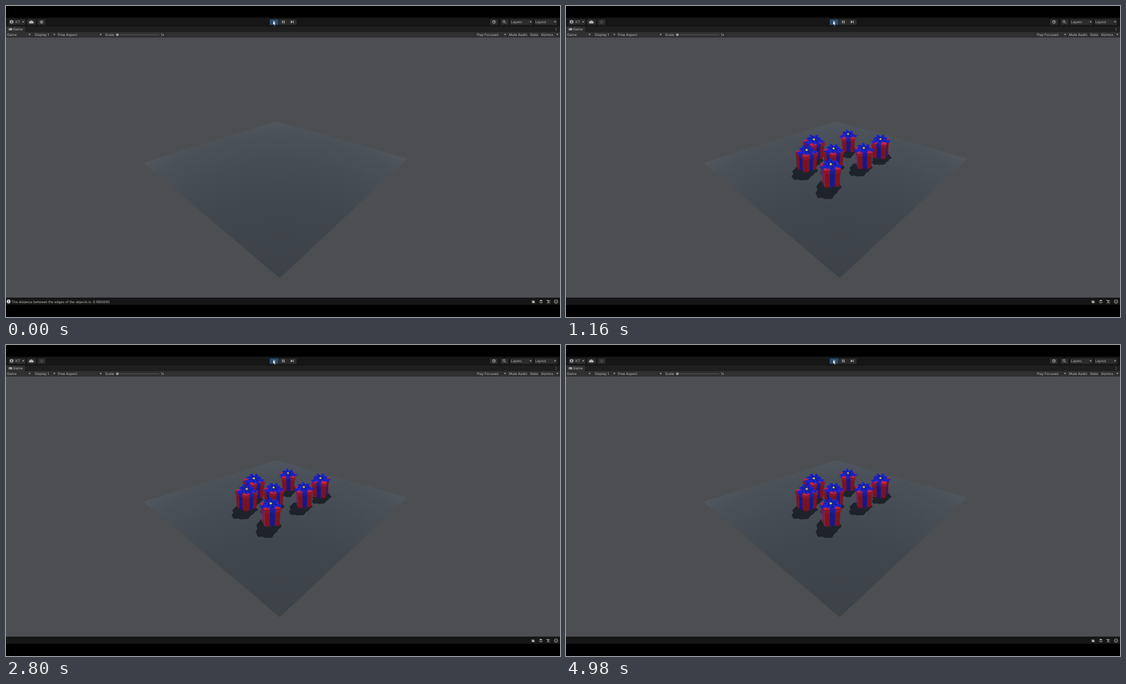
Recreate the animation shown at these times as an HTML page. Size 998 px wide and 561 px high, loop 5020 ms.

```html
<!DOCTYPE html>
<html lang="en">
<head>
<meta charset="utf-8">
<title>Gift drop</title>
<style>
  html, body { margin: 0; width: 100%; height: 100%; overflow: hidden; background: #000; }
  svg { display: block; width: 998px; height: 561px; }
  text { font: 6.15px Inter, "Open Sans", sans-serif; fill: #bdbdbd; text-rendering: geometricPrecision; }
  .line { fill: none; stroke: #b4b4b4; stroke-width: 1; }
  .icon { fill: #b4b4b4; }
</style>
</head>
<body>
<svg id="stage" viewBox="0 0 998 561">
  <defs>
    <radialGradient id="floor" gradientUnits="userSpaceOnUse" cx="492" cy="620" r="420">
      <stop offset=".3" stop-color="#3d4249"/>
      <stop offset=".6" stop-color="#40464d"/>
      <stop offset=".8" stop-color="#464c54"/>
      <stop offset=".92" stop-color="#4b5158"/>
      <stop offset="1" stop-color="#515860"/>
    </radialGradient>
  </defs>
  <rect width="998" height="561"/>
  <rect y="21" width="998" height="16" fill="#161616"/>
  <rect y="37" width="998" height="10" fill="#1f1f1f"/>
  <rect y="37" width="34" height="10" fill="#303030"/>
  <rect y="47" width="998" height="10" fill="#303030"/>
  <rect y="57" width="998" height="469" fill="#4d4e52"/>
  <rect y="526" width="998" height="13" fill="#161616"/>
  <path d="M487 208L723 275L493 491L248 283Z" fill="url(#floor)"/>
  <g id="gifts"><g id="shadows"></g><g id="boxes"></g></g>
  <g id="ui"></g>
</svg>
<script>
const LOOP = 5020, APPEAR = 440, FALL = 860, FALL_RATE = 444;
const QUAD_IN = 'cubic-bezier(.3333,0,.6667,.3333)';
const $ = id => document.getElementById(id);

function add(parent, tag, attrs, text) {
  const el = document.createElementNS('http://www.w3.org/2000/svg', tag);
  for (const key in attrs) el.setAttribute(key, attrs[key]);
  if (text) el.textContent = text;
  return parent.appendChild(el);
}

function play(el, steps) {
  const frames = steps.map(([ms, style, easing = 'linear']) => ({ offset: ms / LOOP, easing, ...style }));
  el.animate(frames, { duration: LOOP, iterations: Infinity });
}

function swap(el, ms, before, after) {
  play(el, [[0, { opacity: before }], [ms, { opacity: before }], [ms, { opacity: after }], [LOOP, { opacity: after }]]);
}

function drop(el, height, dx, dy) {
  const land = FALL + 1000 * Math.sqrt(2 * height / FALL_RATE);
  const up = { transform: `translate(${dx}px, ${dy}px)` };
  const down = { transform: 'translate(0px, 0px)' };
  play(el, [[0, up], [FALL, up, QUAD_IN], [land, down], [LOOP, down]]);
}

const poly = (parent, points, fill) =>
  add(parent, 'polygon', { points: points.map(p => p.map(v => v.toFixed(2)).join()).join(' '), fill });

// One present; the bow's knot is the local origin.
function drawGift(parent, x, y, scale, yaw) {
  const g = add(parent, 'g', { transform: `translate(${x} ${y}) scale(${scale})` });
  const turn = yaw * Math.PI / 180;
  const spot = (angle, half, u, h) => {
    const k = half * (1 - h * .0035);
    const px = k * (Math.sin(angle) + u * Math.cos(angle));
    const pz = k * (Math.cos(angle) - u * Math.sin(angle));
    return [px, 4 + pz * .42 + h];
  };
  const panel = (angle, half, u, h0, h1, fill) => poly(g, [
    spot(angle, half, -u, h0), spot(angle, half, u, h0), spot(angle, half, u, h1), spot(angle, half, -u, h1)
  ], fill);
  const sides = [0, 1, 2, 3].map(i => turn + i * Math.PI / 2);
  const seen = sides.filter(a => Math.cos(a) > .02).sort((a, b) => Math.cos(a) - Math.cos(b));

  for (const a of seen) {
    const lit = Math.sin(a) < -.9;
    panel(a, 14, 1, 3, 30, lit ? '#98283a' : '#7a1421');
    panel(a, 14.1, .32, 3, 30, lit ? '#2029a8' : '#111a8c');
  }
  for (const a of seen) {
    panel(a, 15, 1, 0, 6, '#8c1728');
    panel(a, 15.1, .32, 0, 6, '#151ea4');
  }
  poly(g, sides.map(a => spot(a, 15, 1, 0)), '#c8243f');
  for (const a of sides) {
    poly(g, [spot(a, 15, -.32, 0), spot(a, 15, .32, 0), [2, 4], [-2, 4]], '#1820b4');
  }

  poly(g, [[3, 0], [12, 1], [21, 3], [17, 5], [19, 8], [9, 5]], '#1a23c2');
  poly(g, [[-3, 0], [-13, 3], [-20, 5], [-16, 7], [-17, 10], [-8, 6]], '#1a23c2');
  for (let i = 0; i < 7; i++) {
    const a = turn + i * Math.PI * 2 / 7;
    const cx = Math.cos(a) * 8.2, cy = Math.sin(a) * 4.5;
    const tilt = Math.atan2(cy, cx) * 180 / Math.PI;
    const at = `translate(${cx.toFixed(2)} ${cy.toFixed(2)}) rotate(${tilt.toFixed(1)})`;
    add(g, 'ellipse', { rx: 5.6, ry: 3, transform: at, fill: '#1c26d4' });
    add(g, 'ellipse', { rx: 2.8, ry: 1.1, cy: 1, transform: at, fill: '#11197e' });
  }
  add(g, 'ellipse', { rx: 4.2, ry: 3, fill: '#121a78' });
  add(g, 'ellipse', { rx: 2.3, ry: 1.9, fill: '#c9c66a' });
}

function drawShadow(parent, x, y, w, h) {
  const points = [];
  for (let i = 0; i < 40; i++) {
    const a = i * Math.PI / 20;
    const r = .93 + .07 * Math.sin(5 * a + 1) + .05 * Math.sin(11 * a);
    points.push([x + w / 2 * r * Math.cos(a), y + h / 2 * r * Math.sin(a) - w * .1 * Math.cos(a)]);
  }
  poly(parent, points, '#1e232b');
}

// x, y, scale, yaw, fall height, then shadow centre and size
const GIFTS = [
  [508, 231, .82, 4, 9.5, 509, 263, 28, 24],
  [566.5, 240, .9, -14, 6, 568, 276, 36, 22],
  [446.5, 240.5, .96, 38, 7, 443, 281, 40, 26],
  [482, 257, .92, 40, 19.5, 479, 294, 44, 28],
  [536.5, 256, .95, 8, 11.5, 530, 294, 43, 28],
  [433.5, 259.5, .99, 40, 14, 429, 300, 48, 30],
  [477, 285.5, 1.06, 12, 20.5, 472, 329, 47, 40]
];
for (const [x, y, scale, yaw, height, sx, sy, w, h] of GIFTS) {
  const shade = add($('shadows'), 'g');
  const box = add($('boxes'), 'g');
  drawShadow(shade, sx, sy, w, h);
  drawGift(box, x, y, scale, yaw);
  drop(shade, height, -.3 * height, .6 * height);
  drop(box, height, 0, -height);
}
swap($('gifts'), APPEAR, 0, 1);

const ui = $('ui');
const label = (x, y, text, parent = ui) => add(parent, 'text', { x, y }, text);
const icon = (d, cls = 'icon', parent = ui) => add(parent, 'path', { d, class: cls });
const ring = (cx, cy, r, parent = ui) => add(parent, 'circle', { cx, cy, r, class: 'line' });
const dot = (cx, cy, r, parent = ui) => add(parent, 'circle', { cx, cy, r, class: 'icon' });
const button = (x, w, fill = '#2b2b2b') => add(ui, 'rect', { x, y: 24, width: w, height: 10, rx: 1, fill });
const caret = (x, y) => icon(`M${x - 2} ${y - 1}h4l-2 2.3z`);

// Main toolbar
button(5, 30); button(38, 16); button(57, 14);
button(475, 16, '#294a69'); button(492, 15.5); button(508.5, 15);
button(872, 14); button(891, 14); button(908, 41); button(952, 41);
dot(10, 28.8, 3.3);
add(ui, 'circle', { cx: 10, cy: 27.8, r: 1.1, fill: '#2b2b2b' });
add(ui, 'path', { d: 'M7.8 31a2.3 1.6 0 0 1 4.4 0z', fill: '#2b2b2b' });
label(17, 31, 'KT'); caret(31, 28.8);
icon('M43 31.5a1.9 1.9 0 0 1 0-3.8a2.8 2.8 0 0 1 5.2 0a1.9 1.9 0 0 1 0 3.8z');
const gear = add(ui, 'g');
ring(64, 29, 2.7, gear).setAttribute('stroke-dasharray', '1.4 .7');
ring(64, 29, 1.3, gear);
swap(gear, 300, 1, .32);
icon('M481 26l5 3l-5 3z');
icon('M497.4 26.2h1.5v5h-1.5zM500.2 26.2h1.5v5h-1.5z');
icon('M513 26.2l3.8 2.5l-3.8 2.5zM517 26.2h1.2v5h-1.2z');
ring(879, 28.8, 2.6);
icon('M879 27.2v1.8h1.4', 'line');
ring(897, 28.2, 2);
icon('M898.5 29.7l2 2', 'line');
label(910, 31, 'Layers'); caret(945, 28.8);
label(953.5, 31, 'Layout'); caret(989, 28.8);

// Tab and view options
add(ui, 'rect', { x: 4.5, y: 40, width: 7, height: 4, rx: 2, class: 'icon' });
add(ui, 'path', { d: 'M5.8 42h2M6.8 41v2M9.3 42h1', stroke: '#303030', 'stroke-width': .7 });
label(13, 44.2, 'Game');
for (const y of [40, 42, 44]) dot(991, y, .6);
label(2, 54, 'Game'); caret(42.5, 51.5);
label(52, 54, 'Display 1'); caret(87, 51.5);
label(93.5, 54, 'Free Aspect'); caret(170.5, 51.5);
label(178.5, 54, 'Scale');
add(ui, 'rect', { x: 199, y: 51.5, width: 77, height: .8, fill: '#696969' });
add(ui, 'circle', { cx: 200.5, cy: 51.9, r: 2.4, fill: '#999' });
label(279, 54, '1x');
label(848, 54, 'Play Focused'); caret(899, 51.5);
label(906, 54, 'Mute Audio');
label(944, 54, 'Stats');
label(964, 54, 'Gizmos'); caret(993.3, 51.5);
for (const x of [48.5, 90.5, 174.5, 845.5, 903.5, 941.5, 961.5]) {
  add(ui, 'rect', { x, y: 47, width: .7, height: 10, fill: '#272727' });
}

// Status bar
const note = add(ui, 'g');
add(note, 'circle', { cx: 4.7, cy: 533, r: 3.4, fill: '#ddd' });
add(note, 'path', { d: 'M4.7 531v2.6M4.7 534.3v1', stroke: '#222' });
label(10, 535.5, 'The distance between the edges of the objects is: 0.1900005', note);
swap(note, FALL, 1, 0);
const tools = add(ui, 'g');
add(tools, 'ellipse', { cx: 950, cy: 533.8, rx: 1.8, ry: 2.5, class: 'icon' });
icon('M947 531l6 5M947 533.7h6M947.5 536l5-4.5', 'line', tools).setAttribute('stroke-width', .7);
icon('M960.7 531.5l3.2-1.6l3.2 1.6l-3.2 1.5zM960.7 533.4l3.2 1.5l3.2-1.5v1.2l-3.2 1.6l-3.2-1.6z', 'icon', tools);
icon('M974 530l6.3 6.6M974.5 531.3h5M977 531v5.3M974.8 536l2-1.8M979.5 533l.8-1.5', 'line', tools);
play(tools, [
  [0, { transform: 'translate(0px, 0px)' }], [FALL, { transform: 'translate(0px, 0px)' }],
  [FALL, { transform: 'translate(-.5px, 0px)' }], [LOOP, { transform: 'translate(-.5px, 0px)' }]
]);
ring(990.7, 533.3, 3.1);
icon('M989.2 533.2l1.2 1.2l2-2', 'line').setAttribute('stroke-width', .8);

// Pointer
add(ui, 'path', {
  d: 'M481 27v7.3l1.7-1.5l1.2 2.9l1.4-.6l-1.2-2.8h2.2z',
  fill: '#fff', stroke: '#111', 'stroke-width': .5
});
</script>
</body>
</html>
```
